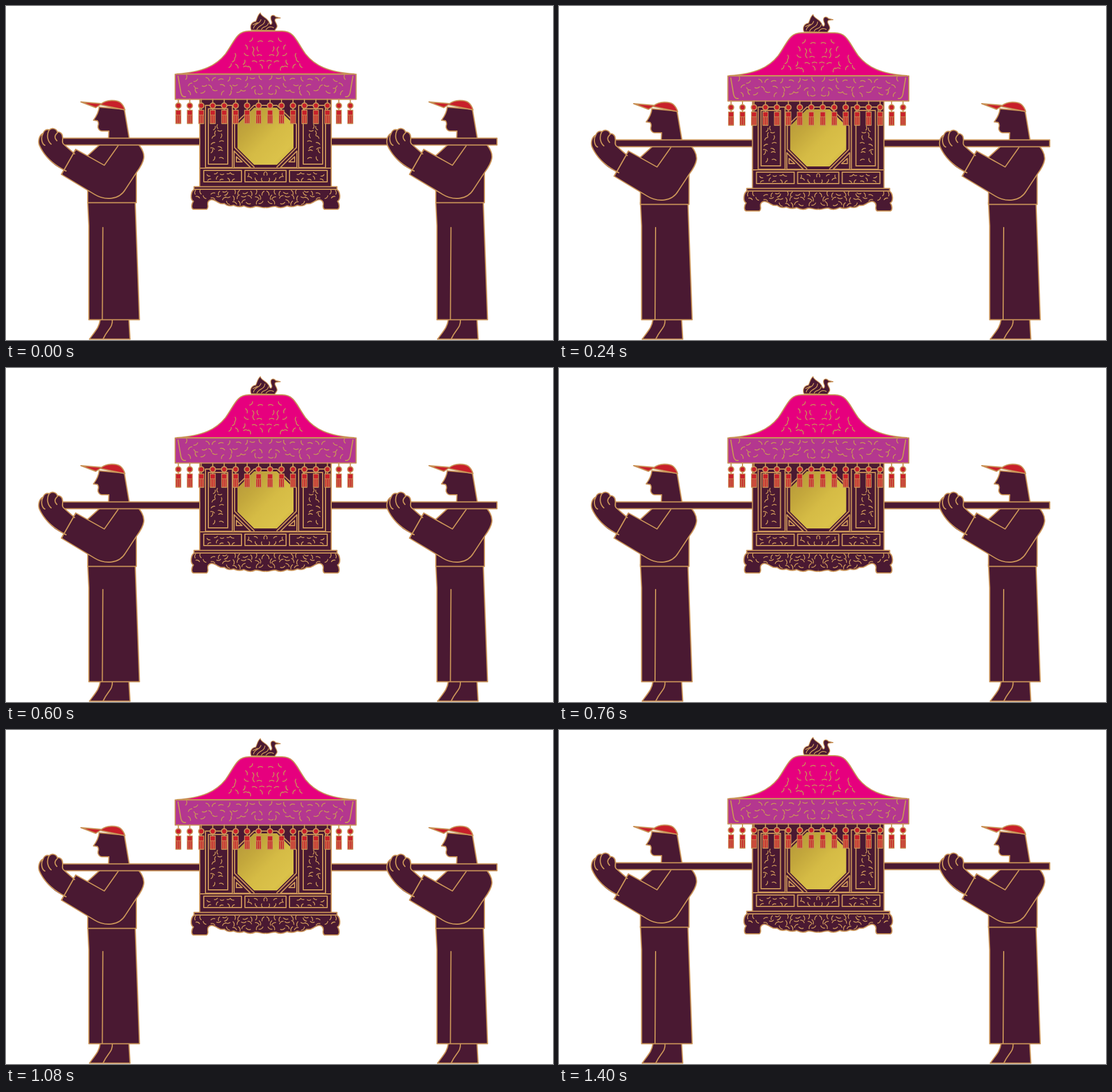
Write an HTML page that moves like this. It is 957 by 585 pixels and loops after 1.44 s.

```html
<!DOCTYPE html>
<html lang="en">
<head>
<meta charset="utf-8">
<title>Sedan chair</title>
<style>
  html, body { margin: 0; width: 100%; height: 100%; overflow: hidden; background: #fff; }
  svg { display: block; }
  .ink { fill: #4a1932; stroke: #c99358; stroke-width: 2; stroke-linejoin: round; stroke-linecap: round; }
  .line { fill: none; }
  .fine { fill: none; stroke-width: 1.5; }
  .red { fill: #c8202a; }
</style>
</head>
<body>
<svg width="957" height="585" viewBox="0 0 957 585">
  <defs>
    <linearGradient id="gold" x1="0" y1="0" x2="1" y2="1">
      <stop offset="0" stop-color="#b2943a"/>
      <stop offset=".3" stop-color="#c3a73c"/>
      <stop offset=".55" stop-color="#d5bb45"/>
      <stop offset=".8" stop-color="#dbc24a"/>
      <stop offset="1" stop-color="#c7a93a"/>
    </linearGradient>
    <g id="legs">
      <path d="M165 549C163 562 159 566 146 583.500H217L215 549"/>
      <path class="line" d="M186 549C187 564 178 565 170 583"/>
      <path d="M143 344 145 385V549.500H233.500L226 344Z"/>
      <path class="line" d="M169.500 388 168.500 549"/>
    </g>
    <g id="torso">
      <path d="M163 177Q162 188 153 200L160 201Q163 205 161 210V213Q163 219 168 219H180L179 240H217L207 181Z"/>
      <path class="red" d="M131 168 167 171C176 164 193 164 200 169Q206 174 208 182L165 173 157 178Z"/>
      <path d="M165 242 143 262V344.500H228V285L240 262 232 242Z"/>
      <path d="M196 245 172 279 122 251 97 295 155 330C173 341 198 340 209 321L228 292C243 272 246 260 233 244"/>
    </g>
    <g id="hand">
      <path d="M120 258 102 243C97 240 99 234 99 230 99 223 94 220 90 221 88 214 80 213 76 217 70 215 66 219 65 223 58 226 56 236 58 243 66 262 83 282 106 289L98 293 122 251Z" stroke="none"/>
      <path class="line" d="M120 259 103 244C96 240 100 234 99 230 99 223 94 220 90 221 88 214 80 213 76 217 70 215 66 219 65 223 58 226 56 236 58 243 66 262 83 278 105 289M122 251 97 295M65 223C60 231 63 242 68 244M75 218C70 228 74 238 79 242M90 222Q82 229 89 236"/>
    </g>
    <g id="tassel">
      <path d="M0 163V184"/>
      <circle class="red" cy="174.500" r="4.700"/>
      <path class="red" d="M-4.500 182.500H4.500V206H-4.500Z" stroke-width="1.300"/>
      <path d="M-4 191H4M-1.600 192V206M1.600 192V206" stroke-width="1.200"/>
    </g>
    <g id="half">
      <path d="M454 353C446 354 442 350 436 351 426 356 420 351 416 350 407 354 402 350 398 349 389 352 385 348 382 346 374 348 371 343 366 341 358 337 352 341 353 348Q354 354 351 356H328C324 355 324 347 328 342 322 339 323 324 330 321H456"/>
      <path class="line" d="M349 174H396V283H349ZM354 180H388V277H354ZM346 288H412V308H346ZM399 283V254L428 283ZM403 273V264L413 273ZM454 174H434L400 207V248L434 282"/>
      <path class="line" d="M301 123 306 152Q308 160 314 159"/>
      <path class="line fine carving"/>
    </g>
  </defs>
  <g id="scene" class="ink">
    <use href="#legs"/><use href="#legs" x="609"/>
    <g id="load">
      <use href="#torso"/><use href="#torso" x="609"/>
      <path d="M99 231.500H859V243.500H99Z"/>
      <use href="#hand"/><use href="#hand" x="609"/>
      <path d="M429 42C426 34 430 28 437 27 440 21 440 16 445 12 446 19 458 20 461 30 463 35 467 31 464 25 461 16 468 14 472 19L480 21 472 22C467 26 476 31 474 37L470 43Z" stroke-width="1.400"/>
      <path class="fine" d="M433 39C435 30 444 32 446 24M439 41C442 33 452 35 453 25M447 41C449 35 458 38 459 30M455 41Q461 34 468 38M432 33 440 29"/>
      <path d="M339 160H569V317H339Z"/>
      <path class="line" d="M339 284H569M418 288H490V308H418Z"/>
      <path fill="#e6007e" d="M299 119C345 116 368 104 384 84 400 62 403 44 425 44H483C505 44 508 62 524 84 540 104 563 116 609 119Z"/>
      <path fill="#b4378f" d="M296 119.500H612.500V163.500H296Z"/>
      <use href="#half"/><use href="#half" transform="matrix(-1 0 0 1 908 0)"/>
      <path d="M329 316.500H579V321H329Z"/>
      <path fill="url(#gold)" stroke="none" d="M434 178H474L503 207V249L474 278H434L405 249V207Z"/>
      <g id="fringe"></g>
    </g>
  </g>
</svg>
<script>
  const $ = s => document.querySelector(s);
  let seed = 11;
  const rand = () => (seed = seed * 16807 % 2147483647) / 2147483647;
  const spread = n => (rand() - .5) * n;

  // Short curved strokes, one to a grid cell
  function carve(x0, y0, x1, y1, step, len, keep = () => true) {
    let d = '';
    for (let y = y0; y <= y1; y += step * .8)
      for (let x = x0; x <= x1; x += step) {
        const px = x + spread(step * .7), py = y + spread(step * .5);
        const a = spread(3), c = Math.cos(a) * len, s = Math.sin(a) * len;
        const bend = rand() < .5 ? -.35 : .35;
        if (keep(px, py))
          d += `M${px - c / 2} ${py - s / 2}q${c / 2 - s * bend} ${s / 2 + c * bend} ${c} ${s}`;
      }
    return d;
  }

  $('.carving').setAttribute('d',
    carve(374, 62, 446, 114, 14, 8, (x, y) => x > 430 - (y - 44) * .75) +
    carve(320, 128, 448, 157, 14, 8) +
    carve(363, 212, 381, 270, 11, 7) +
    carve(355, 294, 405, 303, 11, 6) +
    carve(427, 294, 450, 303, 11, 6) +
    carve(334, 328, 350, 338, 10, 7) +
    carve(360, 327, 380, 336, 10, 7) +
    carve(387, 327, 450, 345, 10, 8));

  $('#fringe').innerHTML = Array.from({ length: 16 }, (_, i) =>
    `<use href="#tassel" x="${301.5 + i * 20.06}"/>`).join('');

  // The load dips and rises three times per loop, in 40 ms steps
  function draw(now) {
    const phase = Math.floor(now % 1440 / 40) * 40 % 480;
    const dip = Math.round(3.2 * Math.sin(Math.PI * phase / 480) ** .7);
    $('#load').setAttribute('transform', `translate(0 ${dip})`);
    $('#scene').setAttribute('transform', `translate(${phase < 200 ? 0 : -.5} 0)`);
  }
  const start = performance.now();
  function tick() {
    draw(performance.now() - start);
    requestAnimationFrame(tick);
  }
  tick();
</script>
</body>
</html>
```
